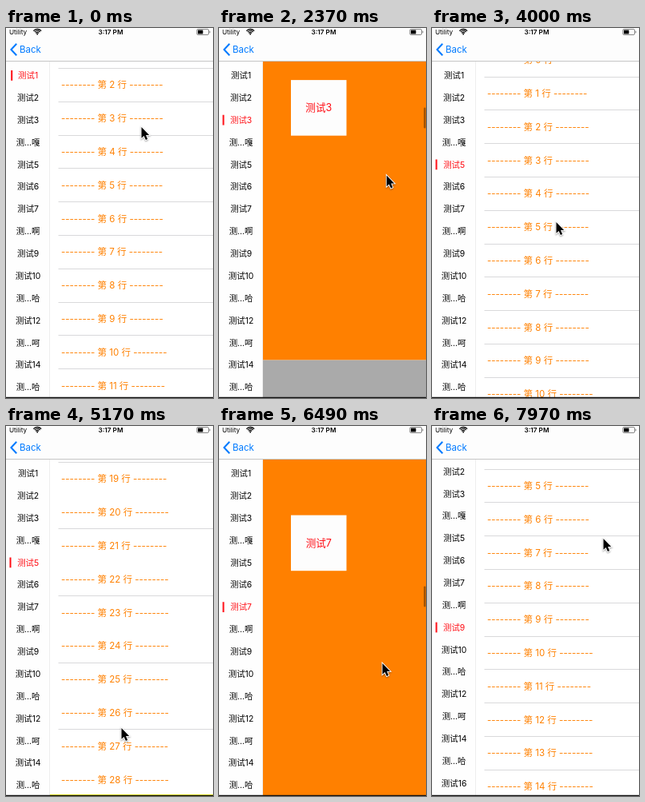
Write an HTML page with a canvas that moves like this. It is 259x463 px and loops after 8000 ms.

```html
<!DOCTYPE html>
<html lang="zh-CN">
<head>
<meta charset="utf-8">
<style>
  html, body { margin: 0; width: 100%; height: 100%; overflow: hidden; background: #fff; }
  canvas { display: block; width: 259px; height: 463px; }
</style>
</head>
<body>
<canvas id="stage"></canvas>
<script>
const W = 259, H = 463, LOOP = 8000, STEP = 147.6;
const TOP = 42, SIDE = 55, MIDDLE = 252;
const ROW = 41.8, ROWS = 29, LIST = 1210.4, PAGE = 420.1, TAB = 27.87;
const ORANGE = '#ff8000', RED = '#ff0d14', BLUE = '#007aff';
const FONT = 'Inter, "Noto Sans CJK SC", "Noto Sans CJK", sans-serif';
const FILLS = [null, '#ffff00', ORANGE, '#aaaaaa'];
const SUFFIXES = { 4: '嘎', 8: '啊', 11: '哈', 13: '呵', 15: '哈' };
const TITLES = Array.from({ length: 17 }, (_, i) =>
  SUFFIXES[i + 1] ? '测…' + SUFFIXES[i + 1] : '测试' + (i + 1));

// Key poses in refresh steps: content top and pointer tip
const POSES = [
  { at: 0, top: -33.6, x: 169.5, y: 124, rest: true },
  { at: 7, top: -1116.4, x: 184.5, y: 160 },
  { at: 16, top: -1635, x: 209.7, y: 184.5 },
  { at: 27, top: -2451.9, x: 155.5, y: 243 },
  { at: 35, top: -3220, x: 144.5, y: 378 },
  { at: 38, top: -3540, x: 165, y: 20 },
  { at: 44, top: -4059.2, x: 204.5, y: 297 },
  { at: 54, top: -5096.9, x: 214.5, y: 141, rest: true }
];
POSES[3].rest = POSES[4].rest = true;

const canvas = document.getElementById('stage');
const ctx = canvas.getContext('2d');
const ratio = window.devicePixelRatio || 1;
canvas.width = W * ratio;
canvas.height = H * ratio;

// Monotone cubic through the poses, with zero speed at rest
function pose(key, n) {
  const last = POSES.length - 1;
  n = Math.min(Math.max(n, 0), POSES[last].at);
  const i = Math.max(0, POSES.findIndex(p => p.at >= n) - 1);
  const a = POSES[i], b = POSES[i + 1];
  const slope = j => (POSES[j + 1][key] - POSES[j][key]) / (POSES[j + 1].at - POSES[j].at);
  const tangent = j => {
    if (POSES[j].rest) return 0;
    const before = slope(j - 1), after = slope(j);
    return before * after <= 0 ? 0 : 2 * before * after / (before + after);
  };
  const d = b.at - a.at, u = (n - a.at) / d, u2 = u * u, u3 = u2 * u;
  return a[key] + (b[key] - a[key]) * (3 * u2 - 2 * u3)
    + d * (tangent(i) * (u3 - 2 * u2 + u) + tangent(i + 1) * (u3 - u2));
}

const sectionHeight = i => i % 4 ? PAGE : LIST;

// The section crossing the middle of the screen
function selected(n) {
  let bottom = pose('top', n), i = 0;
  while ((bottom += sectionHeight(i)) < MIDDLE) i++;
  return i + 1;
}

// The marker trails the selection by averaging the last two steps
function markerTab(n) {
  let sum = 0;
  for (let k = 0; k < 5; k++) sum += selected(n - k / 2);
  return sum / 5;
}

function rect(color, x, y, w, h) {
  ctx.fillStyle = color;
  ctx.fillRect(x, y, w, h);
}

function text(str, x, midY, size, color, align = 'left', weight = 400) {
  ctx.font = `${weight} ${size}px ${FONT}`;
  ctx.textAlign = align;
  ctx.fillStyle = color;
  ctx.fillText(str, x, midY + size * 0.36);
}

function path(points, close) {
  ctx.beginPath();
  points.forEach(([x, y]) => ctx.lineTo(x, y));
  if (close) ctx.closePath();
}

function clipped(x, y, w, h, draw) {
  ctx.save();
  ctx.beginPath();
  ctx.rect(x, y, w, h);
  ctx.clip();
  draw();
  ctx.restore();
}

function drawList(top) {
  for (let k = 0; k < ROWS; k++) {
    const y = top + k * ROW;
    if (y < -ROW || y > H) continue;
    // Scaling the screen down swallows every other hairline low in the list
    const lost = k > 14 && k % 2 === 0;
    if (k && !lost) rect('#d9d9db', 65.5, Math.round(y), W, 1);
    text(`-------- 第 ${k} 行 --------`, 69, y + 21.3, 11.5, ORANGE);
  }
}

function drawPage(top, index) {
  rect(FILLS[index % 4], SIDE, top, W - SIDE, PAGE);
  rect('#fdfdfd', 90, top + 69.6, 69.5, 69.6);
  text(TITLES[index], 124.8, top + 104.4, 12.6, RED, 'center');
}

function drawContent(n) {
  let top = pose('top', n);
  for (let i = 0; top < H; i++) {
    const height = sectionHeight(i);
    if (top + height > 0) {
      if (i % 4) drawPage(top, i);
      else drawList(top);
    }
    top += height;
  }
  const speed = (pose('top', n - 0.01) - pose('top', n + 0.01)) / 0.02;
  ctx.globalAlpha = 0.4 * Math.min(1, Math.max(0, speed / 40));
  ctx.beginPath();
  ctx.roundRect(256.3, TOP + 3.6 * n, 2.2, 26, 1.1);
  ctx.fillStyle = '#000';
  ctx.fill();
  ctx.globalAlpha = 1;
}

function drawSidebar(n) {
  const current = selected(n);
  const center = tab => 59.4 + (tab - 1) * TAB;
  const mark = center(markerTab(n));
  const shift = Math.max(0, mark - MIDDLE);
  rect('#fefefe', 0, TOP, SIDE, H);
  rect('#ededed', 54, TOP, 1, H);
  TITLES.forEach((title, i) => {
    text(title, 27.6, center(i + 1) - shift, 10.4, i + 1 === current ? RED : '#000', 'center');
  });
  rect(RED, current === 1 ? 6.2 : 4.5, mark - shift - 6.4, 2, 12.8);
}

function drawBars() {
  rect('#fdfdfd', 0, 0, W, TOP);
  rect('#b8b8b8', 0, TOP - 0.8, W, 0.8);
  text('Utility', 4, 5, 8.2, '#000');
  text('3:17 PM', 131, 5, 8.2, '#000', 'center', 600);

  ctx.strokeStyle = '#000';
  ctx.lineWidth = 1.3;
  for (let r = 2.5; r < 7; r += 2.1) {
    ctx.beginPath();
    ctx.arc(39.2, 8.2, r, -Math.PI * 0.76, -Math.PI * 0.24);
    ctx.stroke();
  }
  ctx.beginPath();
  ctx.arc(39.2, 7.7, 0.9, 0, 7);
  ctx.fillStyle = '#000';
  ctx.fill();

  ctx.lineWidth = 0.7;
  ctx.strokeStyle = '#555';
  ctx.beginPath();
  ctx.roundRect(238.8, 1.5, 14.8, 7, 1.5);
  ctx.stroke();
  rect('#000', 240, 2.6, 6.4, 4.8);
  rect('#777', 254.4, 3.8, 1, 2.4);

  path([[13.2, 19.7], [6.4, 27], [13.2, 34.3]]);
  ctx.strokeStyle = BLUE;
  ctx.lineWidth = 2;
  ctx.stroke();
  text('Back', 17, 27, 11.5, BLUE);
}

function drawPointer(x, y) {
  ctx.save();
  ctx.translate(x, y);
  path([[0, 0], [0, 13.8], [3.1, 11], [5.4, 16], [7.6, 15], [5.5, 10.1], [9.7, 9.9]], true);
  ctx.shadowColor = 'rgba(0,0,0,.4)';
  ctx.shadowBlur = 2 * ratio;
  ctx.shadowOffsetY = ratio;
  ctx.strokeStyle = '#fff';
  ctx.lineWidth = 1.8;
  ctx.stroke();
  ctx.shadowColor = 'transparent';
  ctx.fillStyle = '#000';
  ctx.fill();
  ctx.restore();
}

function frame(elapsed) {
  const n = Math.floor((elapsed % LOOP + 6) / STEP);
  ctx.setTransform(ratio, 0, 0, ratio, 0, 0);
  rect('#fff', 0, 0, W, H);
  clipped(SIDE, TOP, W - SIDE, H, () => drawContent(n));
  clipped(0, TOP, SIDE, H, () => drawSidebar(n));
  drawBars();
  rect('#111', 0, 461.8, W, 1.2);
  drawPointer(pose('x', n), pose('y', n));
}

const begin = performance.now();
function tick() {
  frame(performance.now() - begin);
  requestAnimationFrame(tick);
}
tick();
</script>
</body>
</html>
```
